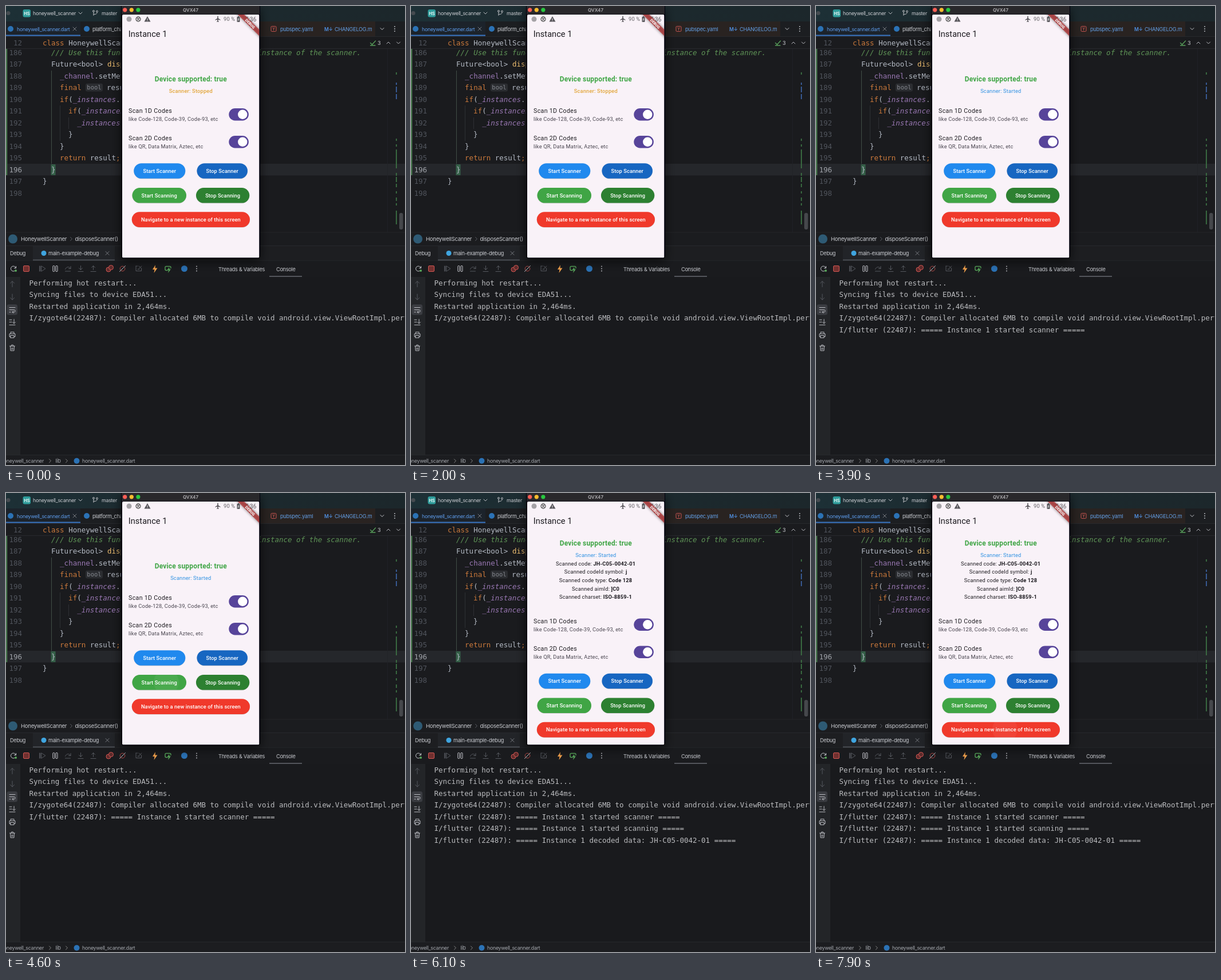
Write an HTML page that moves like this. It is 697 px wide and 803 px high and loops after 8000 ms.

```html
<!DOCTYPE html>
<html lang="en">
<head>
<meta charset="utf-8">
<title>Scanner demo</title>
<style>
html, body { margin: 0; width: 100%; height: 100%; overflow: hidden; background: #1a1b1e; }
svg { display: block; width: 100vw; height: 100vh; }
text { white-space: pre; }
.ui { font: 9.2px Inter, sans-serif; letter-spacing: -.3px; fill: #c9cbd0; }
.code { font: 12.5px "DejaVu Sans Mono", monospace; fill: #b4bac4; }
.log { fill: #bbbcbf; }
.app { font: 9.3px Roboto, sans-serif; letter-spacing: .17px; fill: #1d1b20; }
.it { font-style: italic; }
.b { font-weight: 700; }
.kw { fill: #cc7a3c; }
.field { fill: #9a78b4; }
.name { fill: #f0c070; }
.doc { fill: #5f9557; font-style: italic; }
.label { fill: #fff; font-weight: 500; letter-spacing: .07px; }
.line { fill: none; stroke: #b9bbc0; stroke-width: 1; stroke-linecap: round; stroke-linejoin: round; }
</style>
</head>
<body>
<svg id="stage" viewBox="0 0 697 803" preserveAspectRatio="none"></svg>
<script>
const LOOP = 8000, STEP = 100;
const STARTED = 3400, SCANNING = 4700, DECODED = 5700;
const TAPS = [
  { at: 3100, x: 282.5, y: 289, button: 0 },
  { at: 4400, x: 280, y: 331, button: 2 },
  { at: 7700, x: 330, y: 373, button: 4 },
];

const text = (x, y, s, cls, more = '') => `<text x="${x}" y="${y}" class="${cls}" ${more}>${s}</text>`;
const rect = (x, y, w, h, fill, r = 0, more = '') =>
  `<rect x="${x}" y="${y}" width="${w}" height="${h}" rx="${r}" fill="${fill}" ${more}/>`;
const dot = (x, y, r, fill, more = '') => `<circle cx="${x}" cy="${y}" r="${r}" fill="${fill}" ${more}/>`;
const icon = (x, y, d, color = '#b9bbc0', more = '') =>
  `<path class="line" transform="translate(${x} ${y})" d="${d}" style="stroke:${color};${more}"/>`;
const span = (cls, s) => `<tspan class="${cls}">${s}</tspan>`;
const size = px => `style="font-size:${px}px"`;
const MID = 'text-anchor="middle"', END = 'text-anchor="end"';

const DOWN = 'M-3-1.5 0 1.5 3-1.5', UP = 'M-3 1.5 0-1.5 3 1.5', RIGHT = 'M-1.5-3 1.5 0-1.5 3';
const CROSS = 'M-3-3 3 3M3-3-3 3';
const DOTS = 'M0-4V-4M0 0V0M0 4V4';
const BLUE = '#2b72b5';

function topBars() {
  return rect(0, 0, 697, 27, 'url(#bar)') + dot(4, 12.5, 3.5, '#454b50') +
    rect(29.5, 6, 13.5, 13.5, '#2f9d9b', 3) +
    text(36.3, 15.7, 'HS', 'ui', MID + ' style="font-size:7.5px;font-weight:600;fill:#fff"') +
    text(47, 16, 'honeywell_scanner', 'ui', size(8.9)) + icon(130, 12.5, DOWN) +
    icon(156, 12.5, 'M-3-2V4M-3 2C0 2 3 2 3-1M-4.5-3.5a1.5 1.5 0 1 0 3 0a1.5 1.5 0 1 0-3 0M1.5-3a1.5 1.5 0 1 0 3 0a1.5 1.5 0 1 0-3 0') +
    text(167, 16, 'master', 'ui', size(8.9)) +
    rect(0, 27, 697, 26, '#1c1e21') + rect(0, 27, 130, 26, '#1c232b') +
    rect(444, 27, 201, 26, '#292321') + rect(0, 50.5, 130, 2, '#3b77c4') + rect(0, 53, 697, .8, '#2b2d31') +
    dot(8, 40, 5, BLUE) + text(19, 43.5, 'honeywell_scanner.dart', 'ui', 'style="font-size:8.9px;fill:#5d9bea"') +
    icon(120, 40, CROSS, '#7a7d83') + dot(141, 40, 5, BLUE) + text(151, 43.5, 'platform_channel.dart', 'ui') +
    rect(463, 35.5, 9, 9, 'none', 1.5, 'stroke="#c75450"') +
    text(467.5, 43, 'Y', 'ui', MID + ' style="font-size:7px;fill:#e0605c"') +
    text(479, 43.5, 'pubspec.yaml', 'ui', 'style="fill:#639fe5"') +
    text(556, 43.5, 'M↓', 'ui', 'style="font-size:8.5px;font-weight:600;fill:#4f8fe0"') +
    `<g clip-path="url(#tabs)">${text(574, 43.5, 'CHANGELOG.md', 'ui', 'style="fill:#639fe5"')}</g>` +
    icon(657, 40, DOWN, '#c9cbd0') + icon(679, 40, DOTS, '#c9cbd0', 'stroke-width:1.8');
}

function editor() {
  const code = {
    186: [2, span('doc', '/// Use this function')],
    187: [2, 'Future&lt;bool&gt; ' + span('name', 'disposeScanner')],
    188: [4, span('field', '_channel') + '.setMethod'],
    189: [4, span('kw', 'final')],
    190: [4, span('kw', 'if') + '(' + span('field it', '_instances') + '.'],
    191: [6, span('kw', 'if') + '(' + span('field it', '_instances')],
    192: [8, span('field it', '_instances')],
    193: [6, '}'], 194: [4, '}'],
    195: [4, span('kw', 'return') + ' result' + span('kw', ';')],
    196: [2, '}'], 197: [0, '}'], 198: [0, ''],
  };
  let out = rect(0, 276, 697, 20.5, '#25272b') + rect(0, 75, 2.2, 221, '#47764d') +
    rect(78.5, 277, 8, 19, '#355f48') + rect(79, 113, .8, 163, '#4a5c50');
  for (const [x, y, h] of [[94, 174, 62], [109, 195, 20]]) out += rect(x, y, .8, h, '#34363a');
  for (const [n, [indent, s]] of Object.entries(code)) {
    const y = 85.5 + (n - 186) * 20.54;
    out += text(28, y, n, 'code', `${END} style="fill:${n == 196 ? '#a0a3aa' : '#50545c'}"`) +
      text(64 + indent * 7.52, y, s, 'code');
  }
  out += rect(139, 135.5, 30, 14, '#2b2d31', 3) +
    text(154, 146, 'bool', 'code', MID + ' style="font-size:10.5px;fill:#85888f"') + text(176, 147.2, 'result', 'code') +
    text(620, 85.5, 'instance of the scanner.', 'code doc', END) +
    rect(0, 54, 697, 20.5, '#1a1b1e') + rect(0, 74, 697, .8, '#2c2e32') +
    text(28, 68.5, '12', 'code', END + ' style="fill:#50545c"') +
    text(64, 68.5, span('kw', 'class') + ' HoneywellScanner', 'code') +
    icon(641, 64.5, 'M-4.5 0-1.5 3 4.5-3.5M-4.5 4.5H4', '#58a05b', 'stroke-width:1.3') +
    text(649, 68, '3', 'ui') + icon(668, 64.5, UP) + icon(685.5, 64.5, DOWN);
  const marks = [[116, 4], [232, 4], [242, 4], [251, 33], [292, 5], [299, 9], [311, 6], [324, 4], [335, 6], [345, 4], [358, 24]];
  for (const [y, h] of marks) out += rect(681, y, 1.8, h, '#3c7044');
  for (const [y, h] of [[134, 4], [141, 10], [154, 9]]) out += rect(681, y, 1.8, h, '#3b5f9e');
  return out + rect(666, 75, .8, 321, '#222428') + rect(687, 362, 6.5, 29, '#46484c', 3);
}

function panels() {
  const gray = '#55585e';
  const log = ['Performing hot restart...', 'Syncing files to device EDA51...', 'Restarted application in 2,464ms.',
    'I/zygote64(22487): Compiler allocated 6MB to compile void android.view.ViewRootImpl.performTraversals()',
    ...['started scanner', 'started scanning', 'decoded data: JH-C05-0042-01']
      .map(s => `I/flutter (22487): ===== Instance 1 ${s} =====`)];
  return rect(0, 396, 697, 24, '#1b1c1f') + rect(0, 395.5, 697, .8, '#26282b') +
    dot(12, 407.5, 8, '#2e5a74') + text(26, 411, 'HoneywellScanner', 'ui', size(9.6)) +
    icon(114, 407.5, RIGHT, '#5d6066') + text(120.5, 411, 'disposeScanner()', 'ui', size(9.6)) +
    rect(0, 419, 697, 27, '#1d1e21') + rect(0, 419, 697, .8, '#2a2c30') + rect(47, 420, 143, 25.5, '#222428') +
    text(7, 436, 'Debug', 'ui') + dot(66, 432.5, 4.5, '#3fa5e0') +
    text(74, 436, 'main-example-debug', 'ui') + icon(177, 432.5, CROSS, '#777a80') +
    rect(47, 443.5, 143, 2, '#4d5056') + rect(0, 445.5, 697, .8, '#292b2f') + rect(0, 446, 697, 28, '#1a1b1e') +
    icon(13.5, 459.5, 'M4-4V-1H1M3.8-1A4.5 4.5 0 1 0 1 4.3', '#c5c7cc') + dot(17, 463, 2, '#56a559') +
    rect(30.5, 454.5, 10, 10, '#71302f', 1.5, 'stroke="#d35753"') +
    icon(64, 459.5, 'M-5.5-4.5V4.5M-2-4.5 5 0-2 4.5ZM-4-4.5V4.5', gray) +
    rect(81.8, 454.5, 3, 10, 'none', 1, 'stroke="#c5c7cc"') + rect(87, 454.5, 3, 10, 'none', 1, 'stroke="#c5c7cc"') +
    icon(108.5, 459.5, 'M-5 1C-3-4 2-4 4.5 0M4.5-4V0H1M-5 4.5H4', gray) +
    icon(130.5, 459.5, 'M0-5V2M-3-1 0 2 3-1M-4.5 5H4.5', gray) +
    icon(152.5, 459.5, 'M0 2V-5M-3-2 0-5 3-2M-4.5 5H4.5', gray) +
    dot(179, 461, 4, '#5e2b2b', 'stroke="#d35753"') + dot(183.5, 457.5, 4, '#5e2b2b', 'stroke="#d35753"') +
    dot(203.5, 459.5, 4.3, 'none', 'stroke="#b64a47"') + icon(203.5, 459.5, 'M-5 5 5-5', '#c5c7cc') +
    icon(232, 459.5, 'M-5-4.5H-2M-5-4.5V4H4.5V0M0-4.5 5 0M5-4.5 0 0M-2 1H1', gray) +
    '<path d="M261 453 256 461H259.5L258.5 467 264.5 458.5H260.5Z" fill="#f0a04b"/>' +
    icon(283, 459.5, 'M-1 3H-3Q-5 3-5 1V-2Q-5-4-3-4H3Q5-4 5-2V-1', '#57a55a', 'stroke-width:1.4') +
    '<path d="M285 457 281.5 462H284L283 467 288 460.5H285.5Z" fill="#57a55a"/>' +
    dot(311.5, 459.5, 5.5, BLUE) + icon(333, 459.5, DOTS, '#c5c7cc', 'stroke-width:1.8') +
    text(371, 463.7, 'Threads &amp; Variables', 'ui') + text(472, 463.7, 'Console', 'ui') +
    rect(460, 472, 57, 2, '#53565c') + rect(0, 474, 697, 312, '#191a1d') + rect(0, 474, 25, 312, '#232528') +
    rect(1.5, 522, 18.5, 18.5, '#3a3c41', 3.5) +
    icon(11, 486.5, 'M0 5V-5M-3.5-1.5 0-5 3.5-1.5', gray) +
    icon(11, 509, 'M0-5V5M-3.5 1.5 0 5 3.5 1.5', gray) +
    icon(11, 531.5, 'M-5-4H5M-5 0H3.5Q5 0 5 2T3.5 4H0M2 2 0 4 2 6M-5 4H-3') +
    icon(11, 553, 'M-5-4H-1M-5 0H-1M-5 5H5M3-5V2M.5 0 3 2.5 5.5 0') +
    icon(11, 575.5, 'M-3-2V-5H3V-2M-3 3H-5V-2H5V3H3M-3 1H3V5H-3Z') +
    icon(11, 598, 'M-4.5-3H4.5M-1.5-3V-5H1.5V-3M-3.5-3-3 5H3L3.5-3M-1 0V3M1 0V3') +
    log.map((s, i) => text(40.5, 488.7 + i * 20.5, s, 'code log', `id="log${i}"`)).join('') +
    rect(0, 785.5, 697, 18, '#1c1d20') + rect(0, 785, 697, .8, '#2a2c30') +
    text(66, 799.3, 'honeywell_scanner', 'ui', END + ' style="font-size:8.9px;fill:#a4a7ad"') + icon(77, 795.8, RIGHT, '#888') +
    text(86.5, 799.3, 'lib', 'ui', 'style="fill:#a4a7ad"') + icon(106, 795.8, RIGHT, '#888') +
    dot(123.5, 795.8, 5, BLUE) + text(133, 799.3, 'honeywell_scanner.dart', 'ui', 'style="font-size:8.9px;fill:#a4a7ad"');
}

function option(y, title, note) {
  return text(214, y - 3, title, 'app', 'style="font-size:10.64px;letter-spacing:.33px"') +
    text(214, y + 11.3, note, 'app', 'style="fill:#49454f"') +
    rect(389.3, y - 10.9, 34.6, 21.4, '#57449a', 10.7) + dot(413.3, y - .2, 8.2, '#fff');
}

function button([x, y, w, fill, label], i) {
  const h = 26.6, r = h / 2;
  return `<clipPath id="clip${i}">${rect(x, y, w, h, '#fff', r)}</clipPath>` +
    rect(x, y + .6, w, h, '#0003', r) + rect(x, y, w, h, fill, r) +
    `<g clip-path="url(#clip${i})">${dot(0, 0, 0, '#fff', `id="ripple${i}"`)}</g>` +
    text(x + w / 2, y + 16.6, label, 'app label', MID);
}

function phone() {
  const details = [['code', 'JH-C05-0042-01'], ['codeId symbol', 'j'], ['code type', 'Code 128'], ['aimId', ']C0'], ['charset', 'ISO-8859-1']];
  const buttons = [
    [223.3, 275.2, 90, '#2089ee', 'Start Scanner'], [333.5, 275.2, 88.5, '#1766c1', 'Stop Scanner'],
    [220.5, 318, 94.5, '#40a545', 'Start Scanning'], [332, 318, 93.3, '#2d8031', 'Stop Scanning'],
    [219.8, 360.3, 206.2, '#f0392b', 'Navigate to a new instance of this screen'],
  ];
  return '<path d="M201 0H444V436Q444 441.5 439 441.5H206Q201 441.5 201 436Z" fill="#060607" filter="url(#shadow)"/>' +
    rect(202, 0, 241, 14.5, '#29282b') +
    ['#fe5f57', '#febc2e', '#28c840'].map((c, i) => dot(207.7 + i * 11.6, 6.8, 3.6, c)).join('') +
    text(322.5, 9.6, 'QVX47', 'ui', MID + ' style="font-size:8px;font-weight:600;letter-spacing:0;fill:#b4b3b6"') +
    '<g clip-path="url(#screen)">' + rect(203, 15, 239.5, 425.5, '#f9f2f8') +
    dot(215, 23, 4.5, '#a5a2a6') + dot(231, 23, 4, 'none', 'stroke="#555" stroke-width="1.3"') +
    icon(231, 23, 'M-2-2 2 2M2-2-2 2', '#555', 'stroke-width:1.5') +
    '<path d="M247 18 252.5 27.5H241.5Z" fill="#57555a"/>' + icon(247, 24, 'M0-2V.5M0 2V2', '#f9f2f8') +
    '<path d="M369.2 18Q370 17 370.8 18V21.5L374.5 24V25L370.8 23.7V26.3L372 27.5V28L370 27.5 368 28V27.5L369.2 26.3V23.7L365.5 25V24L369.2 21.5Z" fill="#57555a"/>' +
    text(380, 26.3, '90 %', 'app', 'style="fill:#626064"') +
    rect(403.5, 19, 5, 9, '#57555a', .7) + rect(405, 18, 2, 1.5, '#57555a') + icon(406, 23.5, 'M.8-2.5-.8 0H.8L-.8 2.5', '#fff', 'stroke-width:.8') +
    text(437.5, 26.6, '7:36', 'app', END + ' style="font-size:10px;fill:#57555a"') +
    text(213.8, 54.2, 'Instance 1', 'app', 'style="font-size:14.6px;letter-spacing:0"') +
    '<g id="head">' + text(322.8, 132.2, 'Device supported: true', 'app b', MID + ' style="font-size:12px;fill:#3fa545"') +
    text(322.8, 152.2, '', 'app', MID + ' id="status"') + '</g>' +
    '<g id="details">' + details.map(([k, v], i) =>
      text(322.6, 126.7 + i * 14.65, `Scanned ${k}: ${span('b', v)}`, 'app', MID)).join('') + '</g>' +
    '<g id="body">' + option(190, 'Scan 1D Codes', 'like Code-128, Code-39, Code-93, etc') +
    option(238, 'Scan 2D Codes', 'like QR, Data Matrix, Aztec, etc') + buttons.map(button).join('') +
    '<g id="pointer">' + dot(0, 0, 7.3, '#fff', 'opacity=".45"') + dot(0, 0, 5, '#fff', 'opacity=".5"') + '</g></g>' +
    '<g transform="translate(442.5 15) rotate(45)">' + rect(-40, 18.6, 80, 8, '#000', 0, 'opacity=".5" filter="url(#blur)"') +
    rect(-40, 18.6, 80, 8, '#b71c1c', 0, 'opacity=".63"') +
    text(0, 25, 'DEBUG', 'app', MID + ' style="font-size:6.6px;font-weight:900;letter-spacing:0;fill:#fff"') + '</g></g>';
}

stage.innerHTML = `<defs>
  <linearGradient id="bar"><stop stop-color="#1d3036"/><stop offset=".35" stop-color="#1c2b30"/><stop offset="1" stop-color="#1c272b"/></linearGradient>
  <clipPath id="tabs">${rect(444, 27, 195, 26, '#fff')}</clipPath>
  <clipPath id="screen">${rect(203, 15, 239.5, 425.5, '#fff', 2)}</clipPath>
  <filter id="blur" x="-20%" y="-150%" width="140%" height="400%"><feGaussianBlur stdDeviation="2.6"/></filter>
  <filter id="shadow" x="-20%" y="-20%" width="140%" height="140%"><feDropShadow dx="0" dy="5" stdDeviation="9" flood-color="#000" flood-opacity=".65"/></filter>
</defs>` + rect(0, 0, 697, 803, '#1a1b1e') + editor() + topBars() + panels() + phone();

const el = id => document.getElementById(id);
const show = (node, on) => node.setAttribute('visibility', on ? 'visible' : 'hidden');
const shift = (node, x, y) => node.setAttribute('transform', `translate(${x} ${y})`);

function render(t) {
  const started = t >= STARTED, decoded = t >= DECODED;
  const status = el('status');
  status.textContent = started ? 'Scanner: Started' : 'Scanner: Stopped';
  status.style.fill = started ? '#2d90e2' : '#e2a63a';
  status.style.fontWeight = started ? 400 : 500;
  [STARTED, SCANNING, DECODED].forEach((at, i) => show(el('log' + (i + 4)), t >= at));
  shift(el('head'), 0, decoded ? -40.5 : 0);
  shift(el('body'), 0, decoded ? 40.5 : 0);
  show(el('details'), decoded);

  const touch = TAPS.find(p => t >= p.at && t < p.at + 200);
  show(el('pointer'), touch);
  if (touch) shift(el('pointer'), touch.x, touch.y);
  for (const { at, x, y, button } of TAPS) {
    const age = t - at, ripple = el('ripple' + button);
    const on = age >= 0 && age < 600;
    ripple.setAttribute('cx', x);
    ripple.setAttribute('cy', y);
    ripple.setAttribute('r', on ? 6 + age * .08 : 0);
    ripple.setAttribute('opacity', on ? .05 * Math.min(1, (600 - age) / 300) : 0);
  }
}

const begin = performance.now();
function tick() {
  const t = (performance.now() - begin) % LOOP;
  render(Math.floor(t / STEP) * STEP);
  requestAnimationFrame(tick);
}
tick();
</script>
</body>
</html>
```
